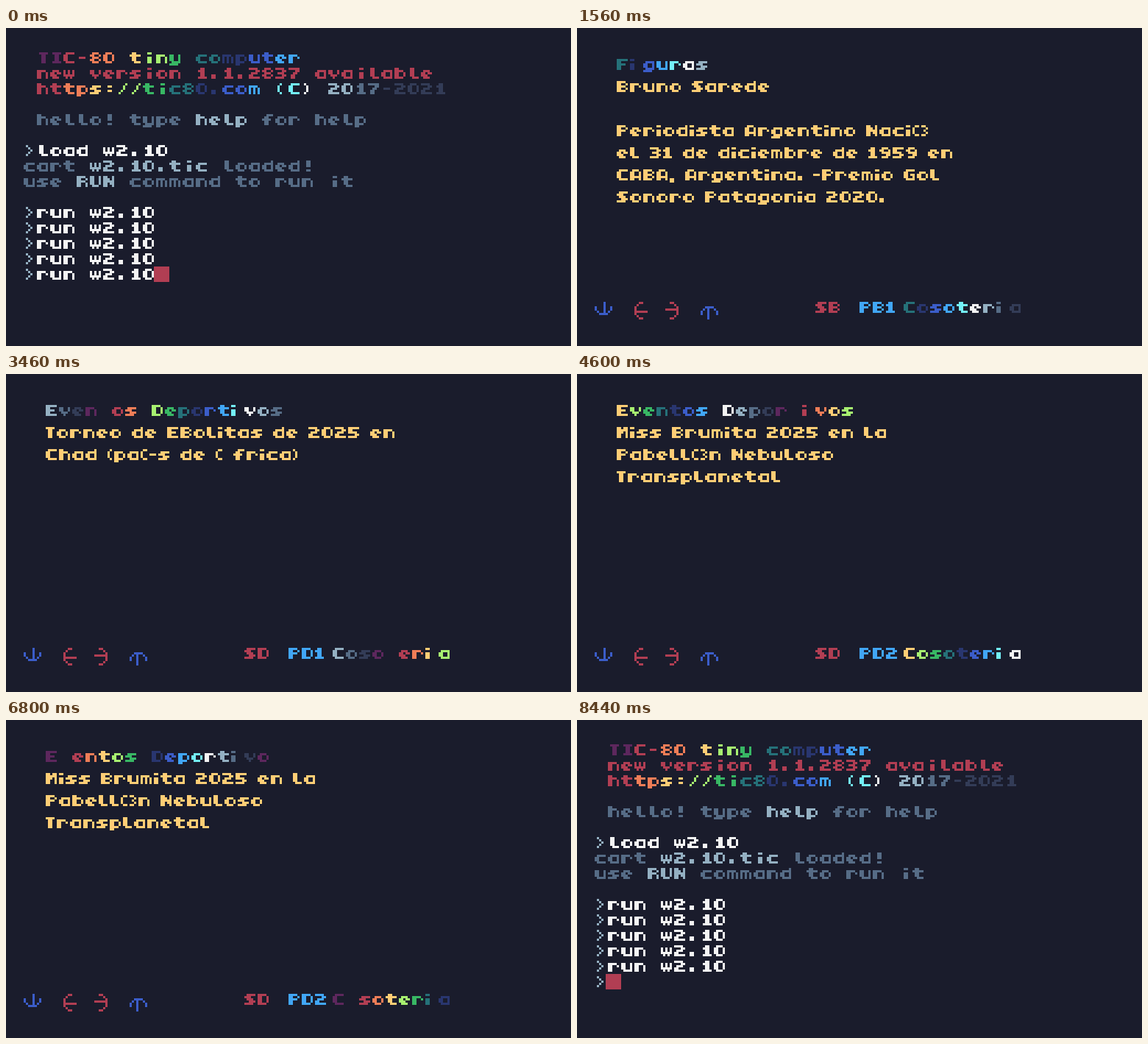
Animation, 768 px wide and 432 px high, one loop 9 s. Source, as an HTML page with a canvas:

```html
<!DOCTYPE html>
<html lang="es">
<head>
<meta charset="utf-8">
<title>Tiny computer</title>
<style>
html, body { margin: 0; width: 100%; height: 100%; overflow: hidden; background: #1a1c2c; }
canvas { display: block; width: 768px; height: 432px; }
</style>
</head>
<body>
<canvas id="screen" width="768" height="432"></canvas>
<script>
const LOOP = 9000, START = 520, END = 8440;
const PALETTE = ['#1a1c2c', '#5d275d', '#b13e53', '#ef7d57', '#ffcd75', '#a7f070', '#38b764', '#257179',
  '#29366f', '#3b5dc9', '#41a6f6', '#73eff7', '#f4f4f4', '#94b0c2', '#566c86', '#333c57'];
const RED = 2, YELLOW = 4, BLUE = 9, SKY = 10, WHITE = 12, LIGHT = 13, GREY = 14;

// Pen strokes: each pair of digits is a point (x, y), spaces lift the pen.
// The pen is two wide and cut off at the cell edge; ~ marks a fine stroke.
const CELL = 5;
const FONT = {
  a: '114144 0203 1434', b: '0004 1121 4243 1424', c: '311102031434', d: '4044 1131 0203 1434',
  e: '1121 0203 32 13 1424', f: '30201114 0222', g: '114144 0203 1434 0525', h: '0004 1121 4244',
  i: '00 0204', l: '0003 1424', m: '1121 ~0104 ~2224 ~4244', n: '0104 1121 4244',
  o: '1121 0203 4243 1424', p: '0105 1121 4243 1424', r: '0104 1121 42', s: '3111021223332404',
  t: '10132434 0131', u: '0103 4144 1434', v: '0102 4142 1323 ~24',
  w: '~0103 ~2123 ~4143 0343 ~14 ~34', y: '0103 4144 1434 0525',
  A: '0104 4144 1020 0343', B: '0004 1020 41 1222 43 1424', C: '301001031434',
  D: '0004 1020 4143 1424', E: '30000434 0222', F: '300004 0222', G: '1030 0103 32 4344 1434',
  I: '0020 1014 0424', L: '000434', M: '0004 4044 3031 1131 12', N: '0004 4044 1133',
  P: '0004 1020 41 1222', R: '0004 1020 41 1222 4344', S: '30100111122223332404',
  T: '0020 1014', U: '0003 4043 1424',
  0: '1020 0103 4143 1424', 1: '0110140424', 2: '0020312212030434', 3: '002031221222332404',
  5: '30000222332404', 7: '0030311314', 8: '1020 01 41 1222 03 43 1424', 9: '1020 01 41 1232 332414',
  '.': '0304', ',': '0405', '-': '0212', ':': '01 03', '!': '0002 04',
  '(': '~10010314', ')': '~00111304', '>': '~002204', '/': '~3004',
  'Ã': '~201001031424', '³': '~00102112231404'
};

const ctx = document.getElementById('screen').getContext('2d');
ctx.setTransform(3, 0, 0, 3, 24, 12);

const parse = strokes => strokes.split(' ').map(s => ({
  pen: s[0] === '~' ? 1 : 2,
  points: s.match(/\d\d/g).map(p => [+p[0], +p[1]])
}));

const GLYPHS = {};
for (const ch in FONT) {
  const strokes = parse(FONT[ch]);
  const right = Math.max(...strokes.flatMap(s => s.points.map(p => p[0] + s.pen)));
  GLYPHS[ch] = { strokes, width: Math.min(CELL, right) };
}

function trace(strokes, x, y, limit = CELL) {
  for (const { pen, points } of strokes) {
    let [px, py] = points[0];
    for (const [qx, qy] of points) {
      const steps = Math.max(Math.abs(qx - px), Math.abs(qy - py), 1);
      for (let i = 0; i <= steps; i++) {
        const cx = Math.round(px + (qx - px) * i / steps);
        const cy = Math.round(py + (qy - py) * i / steps);
        ctx.fillRect(x + cx, y + cy, Math.min(pen, limit - cx), 1);
      }
      [px, py] = [qx, qy];
    }
  }
}

// Proportional text
function print(text, x, y, color) {
  ctx.fillStyle = PALETTE[color];
  for (const ch of text) {
    const g = GLYPHS[ch];
    if (g) trace(g.strokes, x, y);
    x += g ? g.width + 1 : 4;
  }
}

// Console text on a 6 by 7 grid; color may be a function of the index
function type(text, col, row, color) {
  [...text].forEach((ch, i) => {
    const g = GLYPHS[ch];
    if (!g) return;
    const shift = g.width === CELL ? 0 : 'i!:'.includes(ch) ? 2 : 1;
    ctx.fillStyle = PALETTE[typeof color === 'function' ? color(i) : color];
    trace(g.strokes, (col + i) * 6 + shift, row * 7);
  });
}

function cycle(text, x, y, base) {
  [...text].forEach((ch, i) => {
    const c = (base + i) % 16;
    print(ch, x + i * 6, y, c < 2 ? 1 - c : c);
  });
}

const rainbow = first => i => Math.min(15, first + (i >> 1));

function drawConsole(done) {
  type('TIC-80 tiny computer', 1, 1, rainbow(1));
  type('new version 1.1.2837 available', 1, 2, RED);
  type('https://tic80.com (C) 2017-2021', 1, 3, rainbow(2));
  type('hello! type      for help', 1, 5, GREY);
  type('help', 13, 5, LIGHT);
  type('>', 0, 7, LIGHT);
  type('load w2.10', 1, 7, WHITE);
  type('cart           loaded!', 0, 8, GREY);
  type('w2.10.tic', 5, 8, LIGHT);
  type('use     command to run it', 0, 9, GREY);
  type('RUN', 4, 9, LIGHT);
  for (let row = 11; row <= 15; row++) {
    type('>', 0, row, LIGHT);
    type('run w2.10', 1, row, WHITE);
  }
  if (done) type('>', 0, 16, LIGHT);
  ctx.fillStyle = PALETTE[RED];
  ctx.fillRect(done ? 5 : 59, done ? 111 : 104, 7, 7);
}

// One 8 by 8 arrow, turned in quarter steps
const ARROW = parse('~4045 ~0203142555647372');
function arrow(x, turns, color) {
  ctx.save();
  ctx.translate(x + 4, 124);
  ctx.rotate(turns * Math.PI / 2);
  ctx.fillStyle = PALETTE[color];
  trace(ARROW, -4, -4, 8);
  ctx.restore();
}

const PAGES = [
  { from: START, section: 'SB', page: 'PB1', title: 'Figuras', lines: [
    'Bruno Sarede', '', 'Periodista Argentino NaciÃ³', 'el 31 de diciembre de 1959 en',
    'CABA, Argentina. -Premio Gol', 'Sonoro Patagonia 2020.'] },
  { from: 2400, section: 'SD', page: 'PD1', title: 'Eventos Deportivos', lines: [
    'Torneo de EBolitas de 2025 en', 'Chad (paÃ-s de Ã frica)'] },
  { from: 4420, section: 'SD', page: 'PD2', title: 'Eventos Deportivos', lines: [
    'Miss Brumita 2025 en la', 'PabellÃ³n Nebuloso', 'Transplanetal'] }
];

function drawPage(t) {
  const page = PAGES.filter(p => p.from <= t).pop();
  // Colours advance every 50 ms, shown on a 20 ms clock
  const base = 2 * Math.floor(t / 100) + (t % 100 >= 60 ? 1 : 0) + 8;
  cycle(page.title, 10, 10, base);
  page.lines.forEach((line, i) => print(line, 10, 20 + i * 10, YELLOW));
  arrow(0, 0, BLUE);
  arrow(16, 1, RED);
  arrow(32, 3, RED);
  arrow(48, 2, BLUE);
  print(page.section, 100, 120, RED);
  print(page.page, 120, 120, SKY);
  cycle('Cosoteria', 140, 120, base);
}

const born = performance.now();
function frame() {
  const t = (performance.now() - born) % LOOP;
  ctx.fillStyle = PALETTE[0];
  ctx.fillRect(-8, -4, 256, 144);
  if (t < START || t >= END) drawConsole(t >= END);
  else drawPage(t);
  requestAnimationFrame(frame);
}
frame();
</script>
</body>
</html>
```
